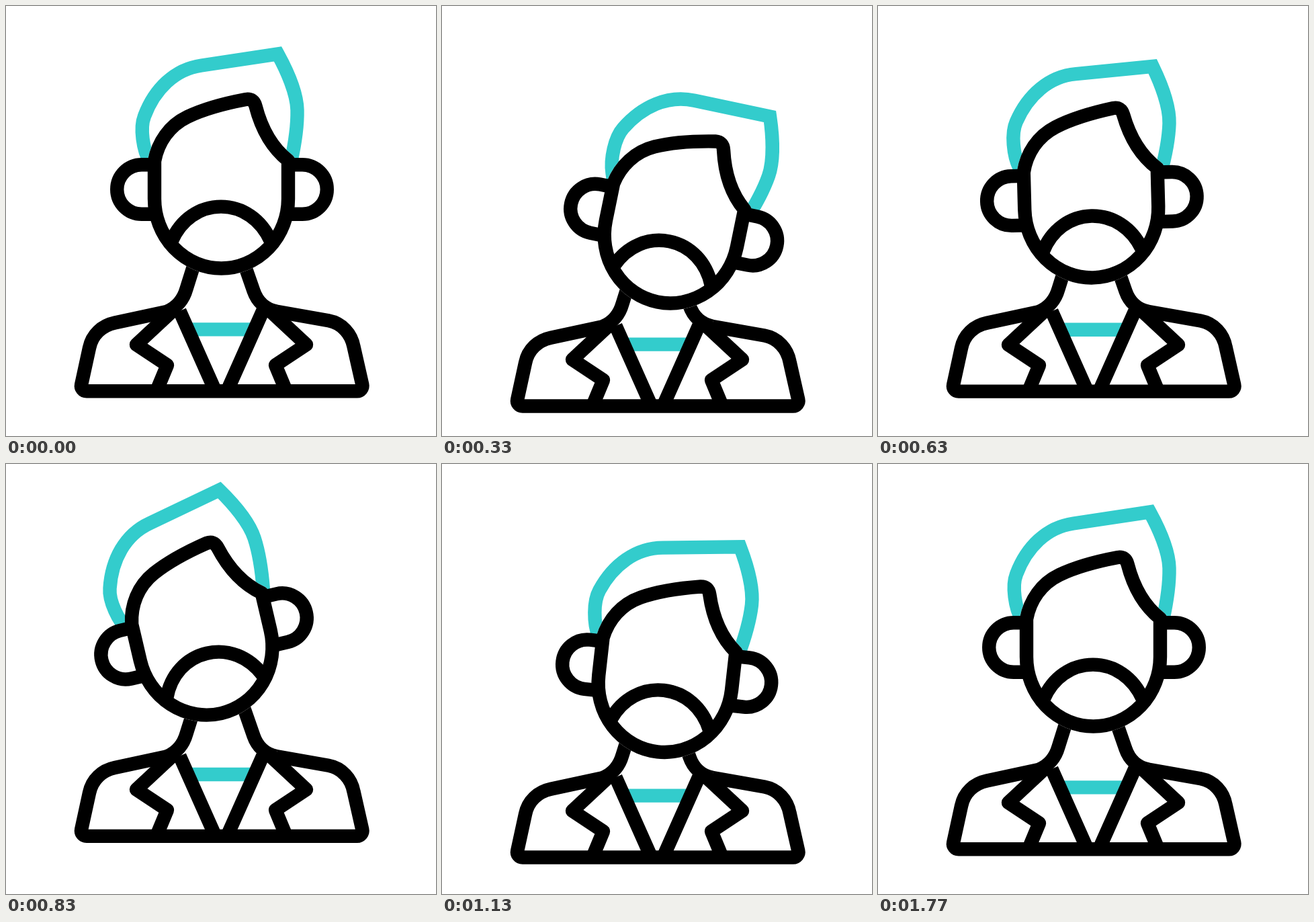
Write an HTML page with a canvas that moves like this. It is 640x640 px and loops after 2000 ms.

```html
<!DOCTYPE html>
<html lang="en">
<head>
<meta charset="utf-8">
<title>Nodding man</title>
<style>
  html, body { margin: 0; width: 100%; height: 100%; overflow: hidden; background: #fff; }
  canvas { display: block; width: 640px; height: 640px; }
</style>
</head>
<body>
<canvas id="stage" width="640" height="640"></canvas>
<script>
const ctx = document.getElementById('stage').getContext('2d');
const INK = '#000', TEAL = '#33cccc', PAPER = '#fff';
const LOOP = 2000, FPS = 30, WEIGHT = 20.4;
const CX = 320.5, CHIN_Y = 391, HAIR_Y = 238;

// Every part swings right, left, right and back to rest; the hair lags behind
const NOD = [400, 840, 1240, 1600];
const LAG = [440, 880, 1440, 1760];

function swing(t, times, peaks) {
  const i = times.findIndex(end => t < end);
  if (i < 0) return 0;
  const t0 = times[i - 1] || 0, a = peaks[i - 1] || 0, b = peaks[i] || 0;
  const u = (t - t0) / (times[i] - t0);
  return a + (b - a) * u * u * (3 - 2 * u);
}

// A path together with its mirror image about x = axis
function pair(d, axis) {
  const half = new Path2D(d), both = new Path2D(half);
  both.addPath(half, new DOMMatrix([-1, 0, 0, 1, 2 * axis, 0]));
  return both;
}

const ears = pair('M223 236.2 H202 A36.8 36.8 0 0 0 202 309.8 H223', 321.5);
const collar = pair('M252 450 L194 504 L240 534.5 L224 573', CX);
const opening = pair('M258.5 454 L311.5 573', 320.3);
const shirt = new Path2D('M274 481.4 H366');

const neck = new Path2D(`
  M282 378 L268.5 421 C264 437 255 448 240 454.5
  M352.5 378 L368.5 424 C374 440 386 451 402 454.5`);

const jacket = new Path2D();
jacket.moveTo(320, 573.3);
jacket.arcTo(110, 573.3, 124, 509, 8);
jacket.lineTo(124, 509);
jacket.bezierCurveTo(128, 489, 143, 475.5, 162, 471.5);
jacket.lineTo(240, 454.8);
jacket.moveTo(402, 454.5);
jacket.lineTo(480, 468.3);
jacket.bezierCurveTo(500, 472, 514, 488, 517.5, 507);
jacket.arcTo(532.5, 573.3, 320, 573.3, 8);
jacket.lineTo(320, 573.3);

const face = new Path2D(`
  M221 231 C226 203 243 178 270 165 C297 152 333 143.5 357 139
  Q368.5 137.5 371.5 149 C380 182 396 211 420 230
  V287 A99.5 103.5 0 0 1 221 287 Z`);

const beard = new Path2D(
  'M246.5 350 C260 318 288 298.6 320 298.6 S380 318 394 350');

const hair = new Path2D(`
  M228 258 L214 232 C204 214 199 182 206 164
  C221 124 251 94 291 88.5 L404.5 71.5
  C418 96 433 130 433.5 155 S430 205 424 232 L418 258`);

function line(color, ...paths) {
  ctx.strokeStyle = color;
  for (const path of paths) ctx.stroke(path);
}

function turn(degrees, y) {
  ctx.translate(CX, y);
  ctx.rotate(degrees * Math.PI / 180);
  ctx.translate(-CX, -y);
}

function drawHead(t) {
  ctx.translate(0, swing(t, NOD, [30, 0, 31]));
  turn(swing(t, NOD, [12.5, -13.2, 10.6]), CHIN_Y);

  ctx.save();
  turn(swing(t, LAG, [10.4, -4.2, 9]), HAIR_Y);
  ctx.lineJoin = 'miter';
  line(TEAL, hair);
  ctx.restore();

  // Paper fill hides the hair ends and the neck
  ctx.fill(ears);
  ctx.fill(face);
  line(PAPER, face);
  line(INK, ears, face, beard);
}

function draw(now) {
  const step = Math.floor(now % LOOP * FPS / 1000 + 0.1);
  const t = step * 1000 / FPS % LOOP;
  ctx.fillStyle = PAPER;
  ctx.fillRect(0, 0, 640, 640);
  ctx.lineWidth = WEIGHT;
  ctx.lineJoin = 'round';
  ctx.save();
  ctx.translate(0, swing(t, NOD, [24, -19.5, 19]));
  line(TEAL, shirt);
  line(INK, neck, jacket, collar, opening);
  drawHead(t);
  ctx.restore();
}

const start = performance.now();
function tick() {
  draw(performance.now() - start);
  requestAnimationFrame(tick);
}
tick();
</script>
</body>
</html>
```
